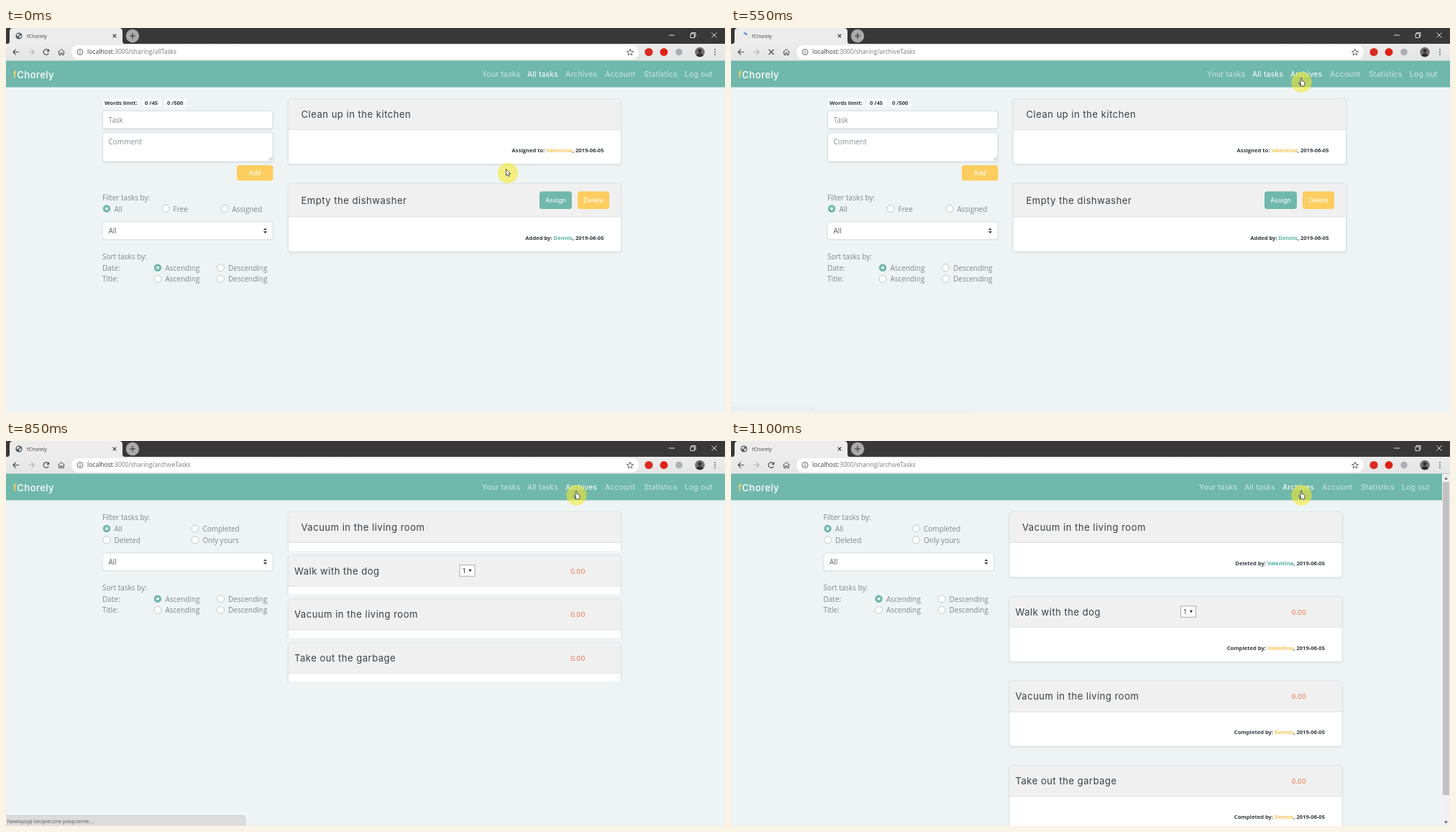
An HTML page with a canvas that plays this animation: 1000 by 536 pixels, repeating every 1.4 s.

```html
<!DOCTYPE html>
<html lang="en">
<head>
<meta charset="utf-8">
<title>Shared tasks</title>
<style>
html, body { margin: 0; width: 100%; height: 100%; overflow: hidden; background: #eef3f4; }
canvas { display: block; width: 1000px; height: 536px; }
</style>
</head>
<body>
<canvas id="stage" width="1000" height="536"></canvas>
<script>
const ctx = document.getElementById('stage').getContext('2d');
const LOOP = 1400, STEP = 50;
const TEAL = '#70b8ac', YELLOW = '#fecd5f', AMBER = '#fcbf4d', PAGE = '#eef3f4', GREY = '#83888b';
const SANS = '"Open Sans", "Noto Sans", sans-serif';
const GEO = 'Inter, "Open Sans", sans-serif';
const BODY = `10px ${SANS}`, SMALL = `bold 7.6px ${SANS}`;
const TITLE = `13.1px ${GEO}`, NAV = `10.4px ${GEO}`;
const BRAND = ['f', 'Chorely'];

const clamp = v => Math.max(0, Math.min(1, v));
const swing = v => 0.5 - Math.cos(Math.PI * clamp(v)) / 2;

// Text is centred on y around the x-height; returns its width.
function text(str, x, y, font, color, { align = 'left', spacing = 0 } = {}) {
  ctx.font = font;
  ctx.letterSpacing = spacing + 'px';
  ctx.textAlign = align;
  ctx.textBaseline = 'alphabetic';
  ctx.fillStyle = color;
  ctx.fillText(str, x, y + parseFloat(font.match(/[\d.]+(?=px)/)[0]) * 0.35);
  return ctx.measureText(str).width;
}

function rect(x, y, w, h, fill) {
  ctx.fillStyle = fill;
  ctx.fillRect(x, y, w, h);
}

function box(x, y, w, h, r, fill, stroke) {
  ctx.beginPath();
  ctx.roundRect(x, y, w, h, r);
  if (fill) { ctx.fillStyle = fill; ctx.fill(); }
  if (stroke) { ctx.strokeStyle = stroke; ctx.lineWidth = 0.8; ctx.stroke(); }
}

function disc(x, y, r, fill, stroke, width = 0.8) {
  ctx.beginPath();
  ctx.arc(x, y, r, 0, Math.PI * 2);
  if (fill) { ctx.fillStyle = fill; ctx.fill(); }
  if (stroke) { ctx.strokeStyle = stroke; ctx.lineWidth = width; ctx.stroke(); }
}

function path(d, x, y, { fill, stroke, width = 1 } = {}) {
  const p = new Path2D(d);
  ctx.save();
  ctx.translate(x, y);
  if (fill) { ctx.fillStyle = fill; ctx.fill(p); }
  if (stroke) {
    ctx.strokeStyle = stroke;
    ctx.lineWidth = width;
    ctx.lineJoin = 'round';
    ctx.stroke(p);
  }
  ctx.restore();
}

function withShadow(draw, blur = 3, dy = 1) {
  ctx.save();
  ctx.shadowColor = 'rgba(70,75,95,.17)';
  ctx.shadowBlur = blur;
  ctx.shadowOffsetY = dy;
  draw();
  ctx.restore();
}

function globe(x, y) {
  disc(x, y, 4.6, '#555b60');
  path('M-3-2Q0-4 1-2L-1 0-3 0ZM1 0L3-1Q4 2 1 3.3L0 1.5Z', x, y, { fill: '#efefef' });
}

function spinner(x, y, t) {
  const age = t - 500, start = -1.9 + age * 0.006;
  const sweep = Math.min(4.7, 1.4 + Math.max(0, age - 50) * 0.023);
  ctx.beginPath();
  ctx.arc(x, y, 4, start, start + sweep);
  ctx.strokeStyle = '#3b78d8';
  ctx.lineWidth = 1.4;
  ctx.stroke();
}

function drawBrowser(t) {
  const loading = t >= 500 && t < 800;
  rect(0, 0, 1000, 23, '#383838');
  path('M2 22Q5 22 5 18V5Q5 0 10 0H157Q162 0 162 5V18Q162 22 165 22Z', 0, 0, { fill: '#ececec' });
  if (loading) spinner(18, 11, t); else globe(18, 11);
  text(BRAND.join(''), 29, 11, `7.2px ${SANS}`, '#444');
  path('M-2.3-2.3L2.3 2.3M2.3-2.3L-2.3 2.3', 151, 11, { stroke: '#333', width: 1.1 });
  disc(176, 11, 9.2, '#aaa');
  path('M-4 0H4M0-4V4', 176, 11, { stroke: '#333', width: 1.2 });
  path('M922 10H930M981.5 6.5L988.5 13.5M988.5 6.5L981.5 13.5M952 8H957.5V13.5H952ZM953.5 8V6.5H959V12H957.5', 0, 0,
    { stroke: '#f2f2f2', width: 0.9 });

  const bar = ctx.createLinearGradient(0, 22, 0, 46);
  bar.addColorStop(0, '#ececec');
  bar.addColorStop(1, '#e5e5e5');
  rect(0, 22, 1000, 24, bar);
  path('M4 0H-4M-.3-3.8L-4 0-.3 3.8', 14, 33.5, { stroke: '#4a4a4a', width: 1.2 });
  path('M-4 0H4M.3-3.8L4 0 .3 3.8', 35, 33.5, { stroke: '#b5b5b5', width: 1.2 });
  if (loading) {
    path('M-3.5-3.5L3.5 3.5M3.5-3.5L-3.5 3.5', 56, 33.5, { stroke: '#4a4a4a', width: 1.2 });
  } else {
    path('M3.3 1.7A3.8 3.8 0 1 1 2.6-2.8', 56, 33.5, { stroke: '#4a4a4a', width: 1.2 });
    path('M4.2-4.5V-.6H.3Z', 56, 33.5, { fill: '#4a4a4a' });
  }
  path('M-4.6 .2L0-4 4.6 .2M-3.2-.6V4H-1V1.2H1V4H3.2V-.6', 77, 33.5, { stroke: '#4a4a4a' });
  box(91, 24, 789, 19.5, 9.7, '#fff');
  disc(103, 33.5, 4, null, '#555', 0.9);
  rect(102.5, 33, 1, 2.8, '#555');
  rect(102.5, 31.2, 1, 1, '#555');
  const url = `8.55px ${SANS}`;
  const w = text('localhost', 113, 33.5, url, '#3c3c3c');
  text(':3000/sharing/' + (t >= 500 ? 'archiveTasks' : 'allTasks'), 113 + w, 33.5, url, '#777');

  let star = '';
  for (let i = 0; i < 10; i++) {
    const a = i * Math.PI / 5 - Math.PI / 2, r = i % 2 ? 2.1 : 4.8;
    star += (i ? 'L' : 'M') + r * Math.cos(a) + ' ' + r * Math.sin(a);
  }
  path(star + 'Z', 868, 34, { stroke: '#555', width: 0.9 });
  disc(894, 33.5, 5.6, '#d92b22');
  disc(915, 33.5, 5.4, '#df2118');
  disc(936, 33.5, 4.8, '#adb0b2');
  ctx.save();
  disc(965, 33.5, 6.8, '#74706f');
  ctx.clip();
  disc(965, 31.8, 2.5, '#302e30');
  disc(965, 40, 5, '#302e30');
  ctx.restore();
  for (const dy of [-3.5, 0, 3.5]) disc(986, 33.5 + dy, 0.9, '#555');
}

function drawNav(t, shift) {
  rect(0, 45.5, 1000, 37, TEAL);
  const w = text(BRAND[0], 10, 65, `500 ${TITLE}`, '#fbd267', { spacing: 0.4 });
  text(BRAND[1], 10 + w, 65, `500 ${TITLE}`, '#fff', { spacing: 0.4 });
  const links = [['Your tasks', 662], ['All tasks', 725], ['Archives', 778],
    ['Account', 833], ['Statistics', 887], ['Log out', 944]];
  for (const [label, x] of links) {
    const lit = label === 'All tasks' ? t < 650 : label === 'Archives' && t >= 300;
    text(label, x - shift * 2, 64.5, NAV, lit ? '#fff' : '#cfe6e2', { spacing: 0.2 });
  }
}

function radio(x, y, label, on) {
  if (on) {
    disc(x, y, 5.2, TEAL);
    disc(x, y, 1.9, '#fff');
  } else {
    disc(x, y, 5, '#fff', '#b4bcc1');
  }
  text(label, x + 10.5, y + 0.5, BODY, GREY);
}

function select(y) {
  withShadow(() => box(134.5, y, 236.5, 24.5, 3, '#fff'), 1.5, 0.5);
  box(134.5, y, 236.5, 24.5, 3, null, '#d8dde1');
  text('All', 142.5, y + 12.5, BODY, '#5b6268');
  path('M-2.5-.9L0-3.7 2.5-.9ZM-2.5 .9L0 3.7 2.5 .9Z', 360.5, y + 12.2, { fill: '#343a40' });
}

function sorting(y) {
  text('Sort tasks by:', 134, y, BODY, GREY);
  ['Date:', 'Title:'].forEach((label, i) => {
    const row = y + 15.5 + i * 15.7;
    text(label, 134, row, BODY, GREY);
    radio(211, row - 0.3, 'Ascending', i === 0);
    radio(298.5, row - 0.3, 'Descending', false);
  });
}

function field(y, h, label) {
  withShadow(() => box(134.5, y, 236.5, h, 3, '#fff'));
  box(134.5, y, 236.5, h, 3, null, '#d2d8dc');
  text(label, 142.5, y + 12.8, BODY, '#858c92');
}

function button(x, y, w, h, label, fill) {
  box(x, y, w, h, 3.5, fill);
  text(label, x + w / 2, y + h / 2, `9px ${GEO}`, '#fff', { align: 'center' });
}

function card({ y, head, height, title, inset = 18, verb, name, color }) {
  withShadow(() => box(392.5, y, 463, height, 3, '#fff'));
  box(392.5, y, 463, head, [3, 3, 0, 0], '#f0f0f0');
  rect(392.5, y + head - 0.4, 463, 0.8, '#dadddf');
  box(392.5, y, 463, height, 3, null, '#dce1e4');
  text(title, 392.5 + inset, y + head / 2 + 0.3, TITLE, '#3b4045', { spacing: 0.48 });
  const line = y + height - 19.3;
  const parts = [[', 2019-06-05', '#343a40'], [name, color], [verb + ' ', '#343a40']];
  let x = 831.5;
  for (const [str, c] of parts) x -= text(str, x, line, SMALL, c, { align: 'right' });
}

function drawTasks() {
  for (const [x, w, label] of [[134, 52, 'Words limit:'], [190, 27, '0 /45'], [221, 30, '0 /500']]) {
    box(x, 98, w, 12.5, 2.5, '#f8fafa');
    text(label, x + 3, 104.3, SMALL, '#343a40');
  }
  field(115.5, 24.5, 'Task');
  field(145.5, 40.5, 'Comment');
  path('M-5 0L0-5M-2 0L0-2', 370, 184.5, { stroke: '#777', width: 0.7 });
  button(321, 191, 50.5, 21.5, 'Add', YELLOW);
  text('Filter tasks by:', 134, 236.5, BODY, GREY);
  radio(140, 251.5, 'All', true);
  radio(222, 251.5, 'Free', false);
  radio(304, 251.5, 'Assigned', false);
  select(270);
  sorting(318.5);
  card({ y: 98.5, head: 43, height: 91, title: 'Clean up in the kitchen',
    verb: 'Assigned to:', name: 'Valentina', color: AMBER });
  card({ y: 216.5, head: 46.5, height: 95, title: 'Empty the dishwasher',
    verb: 'Added by:', name: 'Dennis', color: '#55b3a2' });
  button(742, 227.5, 45, 24.5, 'Assign', TEAL);
  button(795, 227.5, 44, 24.5, 'Delete', YELLOW);
}

const archive = [
  { title: 'Vacuum in the living room', verb: 'Deleted by:', name: 'Valentina', color: '#45ad9d' },
  { title: 'Walk with the dog', verb: 'Completed by:', name: 'Valentina', color: AMBER, rating: true },
  { title: 'Vacuum in the living room', verb: 'Completed by:', name: 'Dennis', color: AMBER },
  { title: 'Take out the garbage', verb: 'Completed by:', name: 'Dennis', color: AMBER },
];

function drawArchive(open, shift) {
  ctx.save();
  ctx.translate(-shift, 0);
  text('Filter tasks by:', 134, 106.5, BODY, GREY);
  radio(140, 122, 'All', true);
  radio(140, 137.7, 'Deleted', false);
  radio(263, 122, 'Completed', false);
  radio(263, 137.7, 'Only yours', false);
  select(156);
  sorting(204.5);
  archive.forEach((item, i) => {
    const y = 98.5 + i * (43 + 74.8 * open);
    ctx.save();
    ctx.beginPath();
    ctx.rect(386, y - 4, 476, 47 + 48.5 * open + (open === 1 ? 6 : 0));
    ctx.clip();
    card({ ...item, y, head: 43, height: 91, inset: i ? 8.5 : 18 });
    if (i) text('0.00', 785, y + 22, `9.6px ${GEO}`, '#ee7850');
    if (item.rating) {
      box(631, y + 13.5, 21, 15.5, 0, '#fff', '#999');
      text('1', 634.5, y + 21.7, `9.5px ${SANS}`, '#222');
      path('M-2-1.5H2L0 2Z', 645.5, y + 21, { fill: '#222' });
    }
    ctx.restore();
  });
  ctx.restore();
}

function drawScrollbar() {
  rect(989, 46, 11, 490, '#f1f1f1');
  rect(990, 57, 9, 436, '#c1c1c1');
  path('M-2.5 1.5L0-1.5 2.5 1.5Z', 994.5, 52, { fill: '#555' });
  path('M-2.5-1.5L0 1.5 2.5-1.5Z', 994.5, 531, { fill: '#555' });
}

function drawStatus(t) {
  const alpha = Math.min(clamp((t - 540) / 150), clamp((1050 - t) / 170));
  if (!alpha) return;
  ctx.save();
  ctx.globalAlpha = alpha;
  box(-2, 521.5, 334.5, 18, [0, 3, 0, 0], '#dcdcdc', '#c8c8c8');
  text('Nawiązuję bezpieczne połączenie...', 1.5, 529, `7.4px ${SANS}`, '#555');
  ctx.restore();
}

// Pointer halo centre: [time, x, y].
const route = [[0, 698, 202], [50, 720, 177], [100, 756, 138], [150, 784, 105],
  [200, 793.5, 93.5], [300, 793.5, 78], [350, 793.5, 75.5], [LOOP, 793.5, 75.5]];

function drawPointer(t) {
  const i = route.findIndex((p, k) => t < route[k + 1][0]);
  const [t0, x0, y0] = route[i], [t1, x1, y1] = route[i + 1];
  const k = (t - t0) / (t1 - t0);
  const x = x0 + (x1 - x0) * k, y = y0 + (y1 - y0) * k;
  disc(x, y, 14.2, 'rgba(246,233,40,.56)');
  if (y > 80) {
    path('M0 0V9L2.1 7.1 3.5 10.2 4.9 9.5 3.6 6.5H6.3Z', x - 2.5, y - 5.5,
      { fill: '#fff', stroke: '#333', width: 0.8 });
  } else {
    path('M-.9 5V-5.3Q-.9-6.3 0-6.3T.9-5.3V-1.8L4-.9Q5-.5 5 .8L4.3 5.3H-.6L-3.7 1.2Q-3.4-.1-2.2 .5L-.9 1.6Z',
      x - 0.5, y, { fill: '#fff', stroke: '#333', width: 0.8 });
  }
}

function draw(t) {
  const open = t >= 1100 ? 1 : swing((t - 722) / 395);
  const scrolling = open > 0.88;
  const shift = scrolling ? 5.5 : 0;
  rect(0, 0, 1000, 536, PAGE);
  drawBrowser(t);
  drawNav(t, shift);
  if (t < 650) drawTasks();
  else if (t >= 750) drawArchive(open, shift);
  if (scrolling) drawScrollbar();
  drawStatus(t);
  drawPointer(t);
}

const began = performance.now();
function tick() {
  const t = (performance.now() - began) % LOOP;
  draw(Math.floor(t / STEP) * STEP);
  requestAnimationFrame(tick);
}
tick();
</script>
</body>
</html>
```
